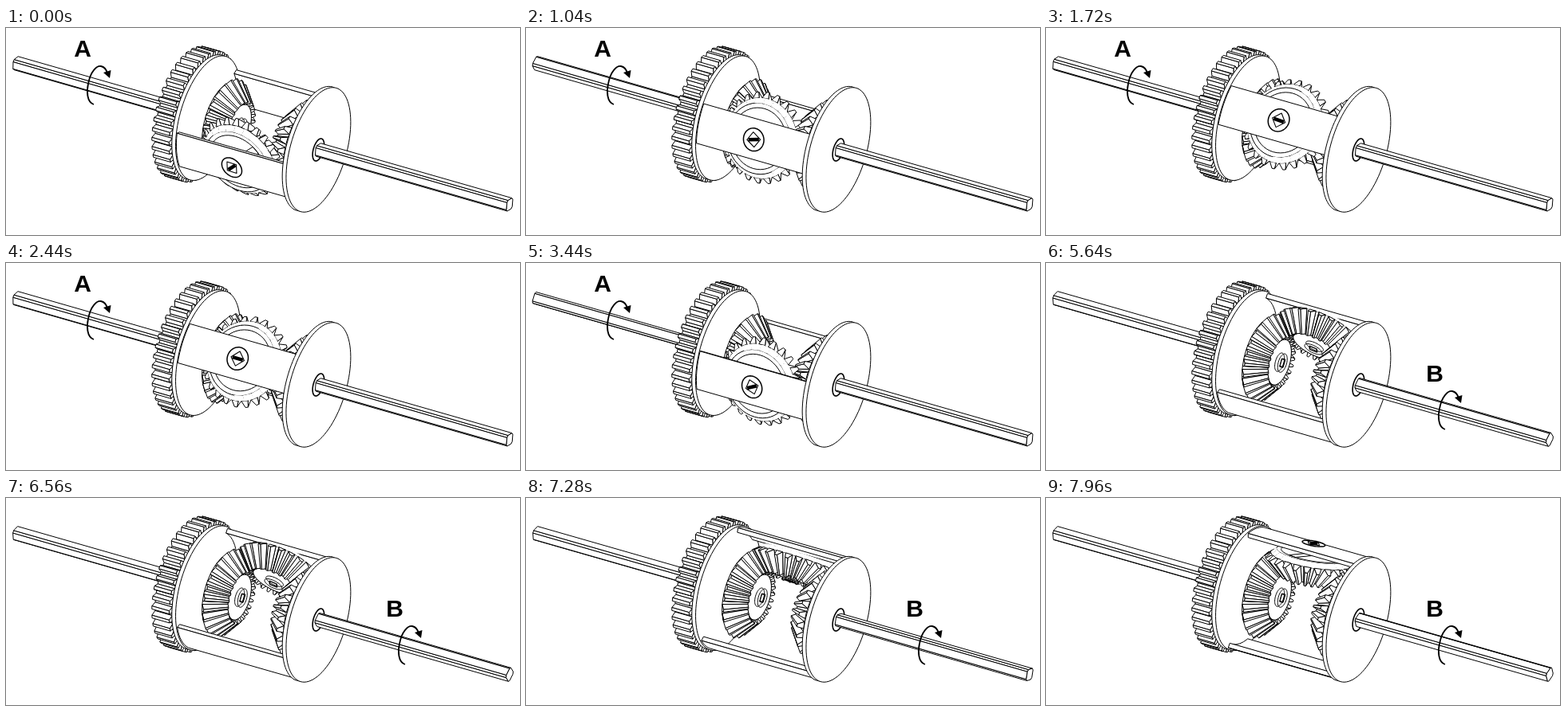
These frames come from a looping animation (644 px wide and 260 px high, 8000 ms). An HTML page with a canvas:

```html
<!DOCTYPE html>
<html>
<head>
<meta charset="utf-8">
<style>
  html, body { margin: 0; height: 100%; overflow: hidden; background: #fff; }
  canvas { display: block; }
</style>
</head>
<body>
<canvas id="stage" width="644" height="260"></canvas>
<script>
const ctx = document.getElementById('stage').getContext('2d');
const RAD = Math.PI / 180;
const sin = deg => Math.sin(deg * RAD), cos = deg => Math.cos(deg * RAD);

// Orthographic view: x right, y down, z towards the viewer.
const CENTER = [322.2, 133.1, 0];
const U = [0.865, 0.2485, 0.435];    // main axis
const V = [-0.276, 0.961, 0];
const W = [-0.418, -0.12, 0.9];
const mix = (a, p, b, q) => p.map((v, i) => a * v + b * q[i]);

// Each drive swings the carrier forth and back in 102 steps.
const LOOP = 8000, STEP = 40, SWITCH = 4080, SWING = 54;
const LEFT = -80, RIGHT = 80, DISC_R = 80.8, DISC_DEPTH = 5.5;
const TEETH = 24, PITCH = 360 / TEETH, RING_TEETH = 40;

const frame = (axis, p, q, flip = 1) => ({ axis, p, q, flip });
const MAIN = frame(U, V, W);
const MIRROR = frame(U.map(v => -v), V, W, -1);
const radial = angle =>
  frame(mix(cos(angle), V, sin(angle), W), U.map(v => -v), mix(-sin(angle), V, cos(angle), W));

function point(f, r, h, angle) {
  const c = r * cos(angle), s = r * sin(angle);
  return CENTER.map((o, i) => o + h * f.axis[i] + c * f.p[i] + s * f.q[i]);
}

function ring(f, r, h, sides = 48, start = 0) {
  return Array.from({ length: sides }, (_, i) => point(f, r, h, start + i * 360 / sides));
}

function trace(pts, close = true) {
  ctx.beginPath();
  pts.forEach(p => ctx.lineTo(p[0], p[1]));
  if (close) ctx.closePath();
}

function fill(pts, stroke = true) {
  trace(pts);
  ctx.fillStyle = '#fff';
  ctx.fill();
  if (stroke) ctx.stroke();
}

function outline(pts, close = true) {
  trace(pts, close);
  ctx.stroke();
}

function facing(pts) {
  return pts.reduce((sum, p, i) => {
    const n = pts[(i + 1) % pts.length];
    return sum + p[0] * n[1] - n[0] * p[1];
  }, 0);
}

// Collects faces turned to the viewer, then paints them back to front.
function addFace(faces, f, pts, stroke = true, details = []) {
  if (facing(pts) * f.flip <= 0) return;
  faces.push({ pts, stroke, details, z: pts.reduce((s, p) => s + p[2], 0) / pts.length });
}

function paint(faces) {
  faces.sort((a, b) => a.z - b.z).forEach(face => {
    fill(face.pts, face.stroke);
    face.details.forEach(d => outline(d));
  });
}

// Each end of a tooth row: root radius, root height, tip radius, tip height.
function addTeeth(faces, f, count, phase, near, far, tipWidth) {
  const pitch = 360 / count;
  const profile = [[-0.34, 0], [-tipWidth, 1], [tipWidth, 1], [0.34, 0], [0.66, 0]];
  for (let i = 0; i < count; i++) {
    const at = end => profile.map(([o, tip]) =>
      point(f, end[tip * 2], end[tip * 2 + 1], phase + (i + o) * pitch));
    const a = at(near), b = at(far);
    for (let k = 0; k < 4; k++) addFace(faces, f, [a[k], a[k + 1], b[k + 1], b[k]]);
    addFace(faces, f, b.slice(0, 4));
    addFace(faces, f, a.slice(0, 4).reverse());
  }
}

function addBevel(faces, f, phase) {
  const outer = [51, 59, 58, 53], inner = outer.map(v => v * 0.58);
  addTeeth(faces, f, TEETH, phase, inner, outer, 0.12);
  for (let i = 0; i < TEETH; i++) {
    const a = phase + i * PITCH, b = a + PITCH;
    addFace(faces, f, [point(f, 51, 59, a), point(f, 51, 59, b),
      point(f, 45, 65, b), point(f, 45, 65, a)], false);
  }
  const bar = [-8, 8, 172, 188].map(o => point(f, 39, 65, phase + 80 + o));
  addFace(faces, f, ring(f, 45, 65), true, [ring(f, 39, 65), bar]);
  addFace(faces, f, ring(f, inner[0], inner[1]).reverse(), true,
    [ring(f, 12, inner[1]), ring(f, 12, 30), ring(f, 7.5, 30, 4, phase + 45), ring(f, 6.5, 30, 4, phase + 45)]);
}

// Square bar with bevelled corners.
function shaft(from, to, angle) {
  const corners = [], R = 8.8, BEVEL = 11;
  for (let k = 0; k < 4; k++) corners.push(angle + 45 + k * 90 - BEVEL, angle + 45 + k * 90 + BEVEL);
  corners.forEach((a, i) => {
    const b = corners[(i + 1) % 8];
    const side = [point(MAIN, R, from, a), point(MAIN, R, from, b), point(MAIN, R, to, b), point(MAIN, R, to, a)];
    if (facing(side) > 0) fill(side);
  });
  fill(corners.map(a => point(MAIN, R, to, a)));
}

function disc(h) {
  fill(ring(MAIN, DISC_R, h - DISC_DEPTH, 90));
  fill(ring(MAIN, DISC_R, h, 90));
}

// Curved bar joining both discs.
function web(center) {
  const a = center - 19, b = center + 19, OUT = 79, IN = 73;
  const strip = (r, first) => {
    for (let w = first - 360; w <= first + 360; w += 360) {
      const lo = Math.max(a, w), hi = Math.min(b, w + 180);
      if (lo >= hi) continue;
      const arc = h => Array.from({ length: 9 }, (_, i) => point(MAIN, r, h, lo + (hi - lo) * i / 8));
      const l = arc(LEFT), m = arc(RIGHT);
      fill([...l, ...m.reverse()], false);
      outline(l, false);
      outline([l[0], m[8]], false);
      outline([l[8], m[0]], false);
    }
  };
  const edge = angle => fill([point(MAIN, IN, LEFT, angle), point(MAIN, OUT, LEFT, angle),
    point(MAIN, OUT, RIGHT, angle), point(MAIN, IN, RIGHT, angle)]);
  strip(IN, 180);
  if (cos(b) > 0) edge(b);
  if (cos(a) < 0) edge(a);
  strip(OUT, 0);
}

function screw(f, angle) {
  ctx.lineWidth = 1.5;
  fill(ring(f, 14.5, 79));
  ctx.lineWidth = 1.1;
  outline(ring(f, 9.5, 79, 4, angle));
  ctx.lineWidth = 4.5;
  outline([point(f, 7.5, 79, angle), point(f, 7.5, 79, angle + 180)], false);
  ctx.lineWidth = 1;
}

function turnMark(label, x, y, textX, textY) {
  ctx.save();
  ctx.fillStyle = '#000';
  ctx.font = 'bold 30px "Liberation Sans", Arial, sans-serif';
  ctx.textAlign = 'center';
  ctx.fillText(label, textX, textY);
  ctx.translate(x, y);
  ctx.lineWidth = 1.8;
  ctx.stroke(new Path2D('M110 96C101 93 101 79 103 70C106 54 114 47 119 48C124 49 126 53 127 57'));
  ctx.fill(new Path2D('M130 63L122 56L131.5 53Z'));
  ctx.restore();
}

// Even forth-and-back turn that holds its peak for two steps.
const swing = (t, start, from) =>
  from + SWING * (1 - (Math.abs(t - start - 50.5 * STEP) / STEP - 0.5) / 50);

function draw(t) {
  const leftDrives = t < SWITCH;
  const carrier = leftDrives ? swing(t, 0, 49.5) : swing(t, SWITCH, 161.7);
  const leftTurn = leftDrives ? 2 * carrier : 0;
  const rightTurn = leftDrives ? 0 : 2 * carrier;
  const spin = leftTurn - carrier + PITCH / 2;
  const planet = radial(carrier);
  const webs = [carrier, (carrier + 180) % 360];

  ctx.fillStyle = '#fff';
  ctx.fillRect(0, 0, 644, 260);
  ctx.strokeStyle = '#000';
  ctx.lineWidth = 1;
  ctx.lineJoin = 'round';

  shaft(-358, -100, leftTurn - 40);
  const rim = [];
  addTeeth(rim, MAIN, RING_TEETH, carrier, [77, -112, 85, -112], [77, -87, 85, -87], 0.16);
  paint(rim);
  disc(LEFT);

  webs.filter(a => sin(a) < 0).forEach(web);
  const gears = [];
  addBevel(gears, MIRROR, leftTurn);
  addBevel(gears, MAIN, rightTurn);
  addBevel(gears, planet, spin);
  paint(gears);
  webs.filter(a => sin(a) >= 0).forEach(web);
  if (sin(carrier) > 0) screw(planet, spin + 80);

  disc(RIGHT);
  ctx.lineWidth = 1.6;
  fill(ring(MAIN, 14.5, RIGHT));
  ctx.lineWidth = 1;
  shaft(RIGHT, 357, rightTurn + 65);

  if (leftDrives) turnMark('A', 0, 0, 96, 35.5);
  else turnMark('B', 390, 113, 487, 148.5);
}

const start = performance.now();
function tick() {
  const t = (performance.now() - start) % LOOP;
  draw(Math.floor(t / STEP) * STEP);
  requestAnimationFrame(tick);
}
tick();
</script>
</body>
</html>
```
